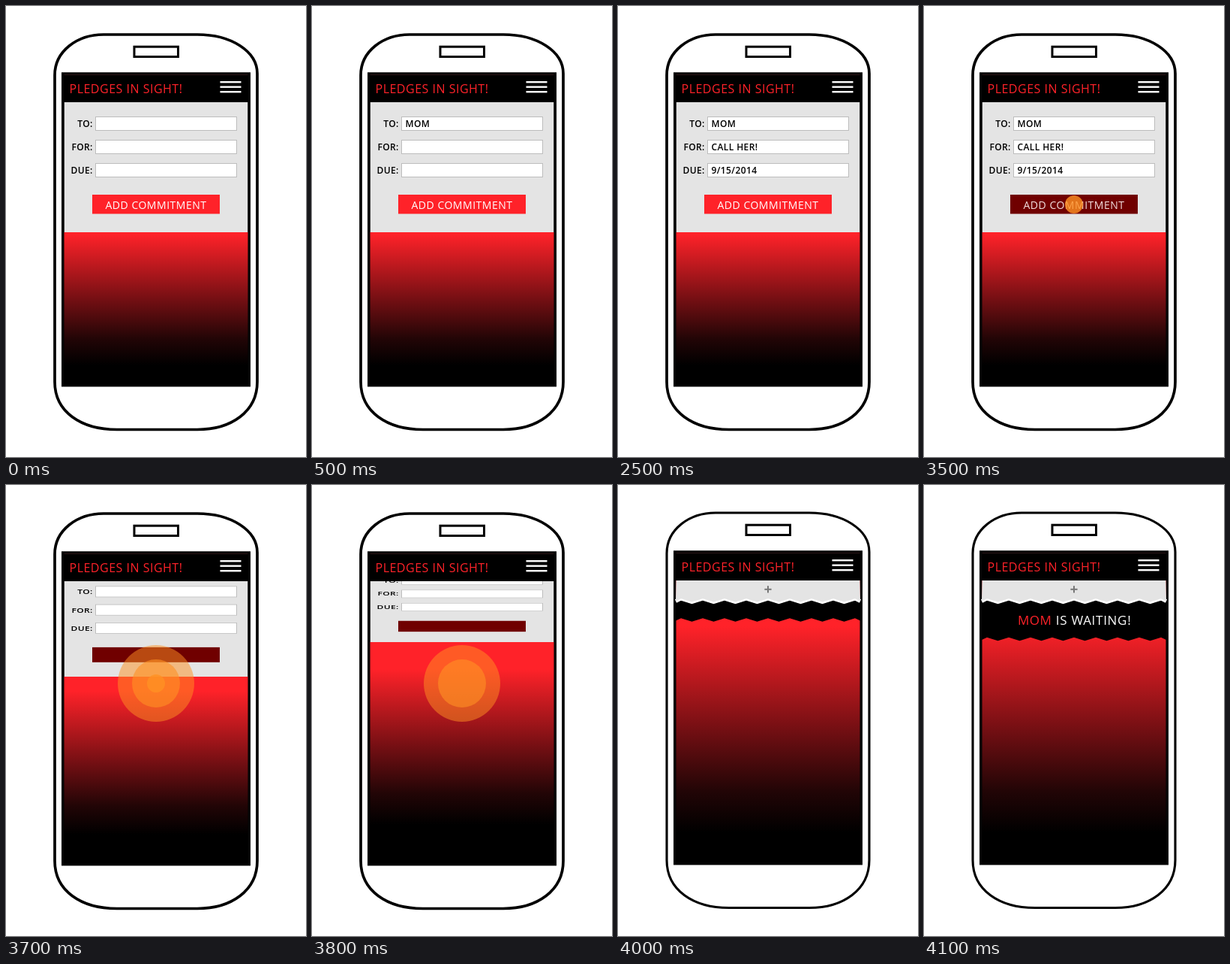
Recreate the animation shown at these times as an HTML page with a canvas. Size 400x600 px, loop 7100 ms.

```html
<!DOCTYPE html>
<html lang="en">
<head>
<meta charset="utf-8">
<title>Commitment app</title>
<style>
html, body { margin: 0; width: 100%; height: 100%; overflow: hidden; background: #fff; }
canvas { display: block; width: 400px; height: 600px; }
</style>
</head>
<body>
<canvas id="stage" width="400" height="600"></canvas>
<script>
const ctx = document.getElementById('stage').getContext('2d');
const LOOP = 7100;
const STEPS = [0, 500, 1500, 2500, 3500, 3600, 3700, 3800, 3900, 4000, 4100];
const RED = '#ff2229', GREY = '#e4e4e4', PRESSED = '#700000';
const LEFT = 77.5, RIGHT = 322.5, TOP = 128;
const OUTLINE = new Path2D('M65 92C65 60 95 38 130 38H255C300 38 335 60 335 90V500' +
  'C335 540 300 563.5 255 563.5H148C100 563.5 65 540 65 500Z');

const ROWS = [
  { label: 'TO:', value: 'MOM', y: 147.5, from: 1 },
  { label: 'FOR:', value: 'CALL HER!', y: 178.5, from: 2 },
  { label: 'DUE:', value: '9/15/2014', y: 209.5, from: 3 }
];

// Ripple radii visible at each step of the tap
const RIPPLES = { 4: [12], 5: [32, 12], 6: [51, 32, 12], 7: [51, 32], 8: [51] };
const ALPHA = { 12: 0.8, 32: 0.6, 51: 0.5 };

function box(x, y, w, h, fill) {
  ctx.fillStyle = fill;
  ctx.fillRect(x, y, w, h);
}

function text(str, x, y, size, weight, spacing, fill, align = 'left') {
  ctx.font = `${weight} ${size}px "Open Sans", "Noto Sans", sans-serif`;
  ctx.letterSpacing = spacing + 'px';
  ctx.textAlign = align;
  ctx.fillStyle = fill;
  ctx.fillText(str, x, y);
}

function drawPhone(thin) {
  ctx.strokeStyle = '#000';
  ctx.lineWidth = thin ? 3.1 : 3.7;
  ctx.stroke(OUTLINE);
  ctx.lineWidth = 3;
  ctx.strokeRect(171, 54.2, 58.5, 13.3);
  box(74, 88.5, 252, 418, '#000');
}

function drawHeader() {
  box(74, 88.5, 252, TOP - 88.5, '#000');
  box(LEFT, 91, RIGHT - LEFT, 1, '#2b1517');
  text('PLEDGES IN SIGHT!', 84.5, 116, 16, 500, 0.5, RED);
  for (let i = 0; i < 3; i++) box(285.5, 100 + i * 6.5, 28, 2.4, '#fff');
}

function drawGlow(top, start, end) {
  const g = ctx.createLinearGradient(0, start, 0, end);
  g.addColorStop(0, RED);
  g.addColorStop(0.5, '#740f13');
  g.addColorStop(0.8, '#220506');
  g.addColorStop(1, '#000');
  box(LEFT, top, RIGHT - LEFT, 506 - top, g);
}

function drawForm(step, bottom, squash) {
  ctx.save();
  ctx.beginPath();
  ctx.rect(LEFT, TOP, RIGHT - LEFT, bottom - TOP);
  ctx.clip();
  ctx.translate(0, bottom);
  ctx.scale(1, squash);
  ctx.translate(0, -301);
  box(LEFT, TOP, RIGHT - LEFT, 173, GREY);
  const open = squash === 1;
  for (const row of ROWS) {
    box(119.5, row.y, 188, 18, '#fff');
    ctx.strokeStyle = '#bdbdbd';
    ctx.lineWidth = 1;
    ctx.strokeRect(119.5, row.y, 188, 18);
    text(row.label, 115.5, row.y + 13.5, 12, 600, 0.3, '#000', 'right');
    if (open && step >= row.from) text(row.value, 124.5, row.y + 13.5, 12, 600, 0.4, '#000');
  }
  box(115, 251, 170, 25.5, step >= 4 ? PRESSED : RED);
  if (open) text('ADD COMMITMENT', 132.5, 269.5, 14, 500, 0.5, step >= 4 ? '#f0dede' : '#fff');
  ctx.restore();
}

// Torn edge around height y, left to right
function zigzag(y, amp) {
  ctx.beginPath();
  ctx.moveTo(LEFT - 0.5, y + amp / 2);
  for (let i = 0; i < 17; i++) ctx.lineTo(84 + i * 14.5, y + (i % 2 ? amp : -amp));
  ctx.lineTo(RIGHT + 0.5, y + amp / 2);
}

function drawFolded(band) {
  drawGlow(TOP, 189, 463);
  if (band) {
    zigzag(155 + 51 * band, 2.2);
    ctx.lineTo(RIGHT + 0.5, 150);
    ctx.lineTo(LEFT - 0.5, 150);
    ctx.fillStyle = '#000';
    ctx.fill();
  }
  zigzag(154.3, 2.3);
  ctx.lineWidth = 5;
  ctx.strokeStyle = '#fff';
  ctx.stroke();
  ctx.lineTo(RIGHT, TOP);
  ctx.lineTo(LEFT, TOP);
  ctx.save();
  ctx.translate(0, -2.4);
  ctx.fillStyle = GREY;
  ctx.fill();
  ctx.restore();
  box(195.4, 138.8, 9.2, 2, '#777');
  box(199, 135.2, 2, 9.2, '#777');
  if (band === 1) {
    text('MOM', 125, 187, 17, 500, 0.5, RED);
    text('IS WAITING!', 175.8, 187, 17, 500, 0.7, '#fff');
  }
}

function drawRipples(step) {
  for (const r of RIPPLES[step] || []) {
    ctx.fillStyle = `rgba(255,145,35,${ALPHA[r]})`;
    ctx.beginPath();
    ctx.arc(200, 264, r, 0, Math.PI * 2);
    ctx.fill();
  }
}

function draw(time) {
  const step = STEPS.filter(s => s <= time).length - 1;
  const folded = step >= 8;
  box(0, 0, 400, 600, '#fff');
  ctx.save();
  if (folded) ctx.translate(0, -1);
  drawPhone(folded);
  if (folded) {
    drawFolded((step - 8) / 2);
  } else {
    const fold = Math.max(0, step - 5);
    const bottom = 301 - 46 * fold;
    drawGlow(bottom, 303 - 29 * fold, 478 - 13 * fold);
    drawForm(step, bottom, 1 - 0.2175 * fold);
  }
  drawHeader();
  drawRipples(step);
  ctx.restore();
}

let start;
function tick(now) {
  if (start === undefined) start = now;
  draw((now - start) % LOOP);
  requestAnimationFrame(tick);
}
requestAnimationFrame(tick);
</script>
</body>
</html>
```
